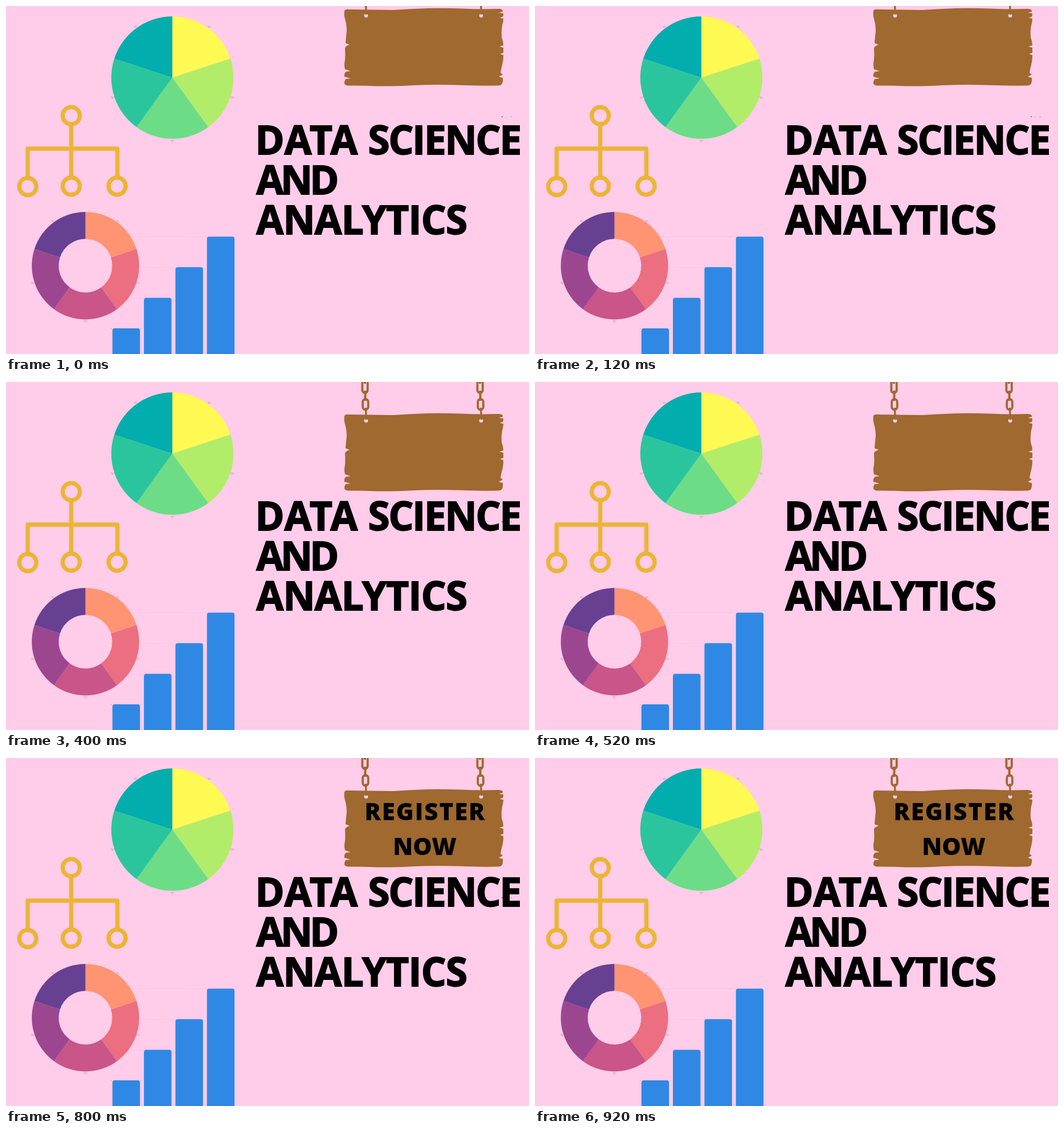
An HTML page for the animation above (1 s loop, 918 by 610 pixels).

```html
<!DOCTYPE html>
<html lang="en">
<head>
<meta charset="utf-8">
<title>Data Science and Analytics</title>
<style>
  html, body { margin: 0; width: 100%; height: 100%; overflow: hidden; background: #ffccea; }
  svg { display: block; width: 918px; height: 610px; }
  text { font-family: "Open Sans", "Noto Sans", sans-serif; }
  .title { font-size: 69px; font-weight: 700; stroke: #000; stroke-width: 1.9; }
  .call { font-size: 42px; text-anchor: middle; }
  .tiny { font-size: 2.2px; fill: #555; text-anchor: middle; }
  .tree { fill: none; stroke: #ebb535; stroke-width: 7.4; stroke-linejoin: round; }
  .chain { fill: none; stroke: #9f692f; stroke-width: 3.8; }
</style>
</head>
<body>
<svg id="stage" viewBox="0 0 918 610">
  <g id="pie"></g>

  <g class="tree">
    <path d="M114.5 208V299M38 300V250H195.5V300"/>
    <circle cx="114.5" cy="192.3" r="15"/>
    <circle cx="38.2" cy="316.5" r="15"/>
    <circle cx="114.5" cy="315.8" r="15"/>
    <circle cx="195" cy="315.8" r="15"/>
  </g>

  <path d="M187 404.5H353M187 458.5H298M187 512H242" stroke="#f4c0df" stroke-width=".6"/>
  <g id="ring"></g>
  <g id="bars" fill="#2f89e4"></g>

  <g id="sign">
    <defs>
      <g id="chain" class="chain">
        <rect x="625.4" y="-7" width="9.4" height="26" rx="4.7"/>
        <path d="M630 -20V3M630.5 15V33" stroke-width="4"/>
        <rect x="626.2" y="30" width="9.6" height="18.5" rx="4.8"/>
        <path d="M631.5 45L632.3 66" stroke-width="3.4"/>
      </g>
    </defs>
    <path fill="#9f692f" d="M594 60Q595 56 602 57Q640 57.500 680 58Q710 56 740 55Q770 54.500 800 55.500Q830 57 864 56
      Q873 56 872 61L865 62.500L873 64Q873 68 872 70L866 71.500L873 73Q873 79 871 85Q869 95 870 106Q873 113 873 120
      L866 122L873 124V133L867 135L873 137Q873 147 871 154Q869 162 868 168L872 171L865 175L872 177Q873 182 871 187
      Q869 191 861 190.500Q825 191 790 189.500Q755 188.500 715 190Q680 192 650 191.500Q625 190 601 190.500
      Q593 190 594 184L596 179L605 178L594 175Q593 169 597 166L605 165L595 162Q593 153 595 146Q596 135 595 126
      Q595 121 603 119L596 116Q597 105 598 95Q598 82 595 74Q593 66 594 60Z"/>
    <g fill="#ffccea">
      <circle cx="632" cy="67.8" r="3.4"/>
      <circle cx="834" cy="67.8" r="3.4"/>
    </g>
    <use href="#chain"/>
    <use href="#chain" x="202"/>
    <g fill="#9f692f">
      <circle cx="871" cy="245" r="1.1"/>
      <circle cx="878" cy="245.5" r=".5"/>
      <circle cx="886.5" cy="245" r=".7"/>
    </g>
  </g>

  <g id="light" class="call" font-weight="300" stroke="#000" stroke-width=".5">
    <text x="735.5" y="108" letter-spacing="-.3">REGISTER</text>
    <text x="735.5" y="168.5">NOW</text>
  </g>
  <g id="bold" class="call" font-weight="800">
    <text x="736" y="108.5" letter-spacing="1.9">REGISTER</text>
    <text x="735" y="169.5">NOW</text>
  </g>

  <g class="title">
    <text x="437.5" y="259.5" letter-spacing="1.5">DATA</text>
    <text x="635.5" y="259.5" letter-spacing="-2.1">SCIENCE</text>
    <text x="439.5" y="329.5" letter-spacing="-5">AND</text>
    <text x="439.5" y="399.5" letter-spacing="-.7">ANALYTICS</text>
  </g>
</svg>

<script>
const $ = id => document.getElementById(id);

function add(parent, tag, attrs, text) {
  const el = document.createElementNS("http://www.w3.org/2000/svg", tag);
  for (const key in attrs) el.setAttribute(key, attrs[key]);
  if (text) el.textContent = text;
  parent.append(el);
}

const tiny = (parent, x, y, text) => add(parent, "text", { class: "tiny", x, y }, text);

// Equal slices, clockwise from the top; inner = 0 gives a full pie.
function slices(parent, cx, cy, outer, inner, labelR, colors) {
  const step = 2 * Math.PI / colors.length;
  const at = (r, a) => `${cx + r * Math.sin(a)} ${cy - r * Math.cos(a)}`;
  colors.forEach((fill, i) => {
    const a = i * step, b = a + step, mid = a + step / 2;
    add(parent, "path", {
      fill,
      d: `M${at(inner, a)}L${at(outer, a)}A${outer} ${outer} 0 0 1 ${at(outer, b)}` +
         `L${at(inner, b)}A${inner} ${inner} 0 0 0 ${at(inner, a)}Z`
    });
    const x = cx + labelR * Math.sin(mid), y = cy - labelR * Math.cos(mid);
    tiny(parent, x, y, "Item " + (i + 1));
    tiny(parent, x, y + 2.2, "20%");
  });
}

slices($("pie"), 292, 125.5, 107.2, 0, 110.5,
  ["#fff953", "#b1ed69", "#6ddc87", "#2bc59d", "#02adad"]);
slices($("ring"), 139.5, 455.2, 94.2, 47, 97,
  ["#ff9473", "#eb6f80", "#c95589", "#9c4690", "#684091"]);

for (let i = 0; i < 4; i++) {
  const y = 565 - i * 53.6;
  add($("bars"), "rect", { x: 186.8 + i * 55.3, y, width: 48.4, height: 260, rx: 4 });
}
tiny($("bars"), 185, 459, "15");
tiny($("bars"), 185, 566, "5");

// Each step holds its value until the next one.
function hold(id, prop, steps) {
  const frames = steps.map(([offset, value]) => ({ offset, [prop]: value, easing: "step-end" }));
  frames.push({ offset: 1, [prop]: steps[steps.length - 1][1] });
  $(id).animate(frames, { duration: 1000, iterations: Infinity }).startTime = 0;
}

hold("sign", "transform", [[0, "translateY(-51px)"], [.2, "translateY(-41px)"], [.4, "translateY(0px)"]]);
hold("light", "opacity", [[0, 0], [.6, 1], [.8, 0]]);
hold("bold", "opacity", [[0, 0], [.8, 1]]);
</script>
</body>
</html>
```
